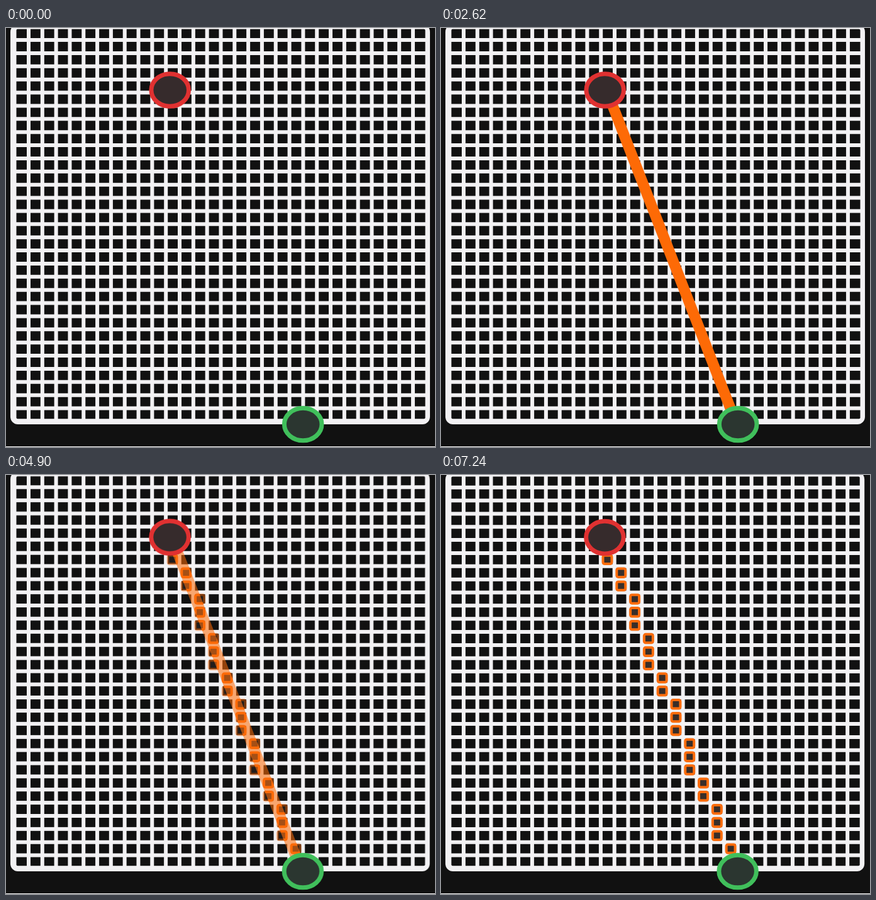
Write an HTML page that moves like this. It is 682x665 px and loops after 8.04 s.

```html
<!DOCTYPE html>
<html lang="en">
<head>
<meta charset="utf-8">
<title>Line to grid cells</title>
<style>
  html, body { margin: 0; width: 100%; height: 100%; overflow: hidden; background: #111; }
  svg { display: block; width: 100%; height: 100%; }
</style>
</head>
<body>
<svg viewBox="0 0 682 665">
  <defs>
    <g id="board">
      <rect x="7" y="-6" width="667" height="635" rx="12" fill="#f2f1f3"/>
      <rect x="16.5" y="1.8" width="650" height="618.4" rx="2" fill="#111"/>
      <path id="lines" stroke="#f2f1f3" stroke-width="6" fill="none"/>
    </g>
    <g id="ends" stroke-width="7">
      <ellipse cx="260.7" cy="98.5" rx="29.8" ry="25.8" fill="#362b2c" stroke="#e03131"/>
      <ellipse cx="472.2" cy="629" rx="29.8" ry="25.8" fill="#2b3630" stroke="#40bf5b"/>
    </g>
  </defs>
  <rect width="682" height="665" fill="#111"/>
  <use href="#board"/>
  <path id="ray" d="M263.8 100L470 629" stroke="#fd6a06" stroke-width="17.2"/>
  <use href="#ends"/>
  <g id="cellScene">
    <rect width="682" height="665" fill="#111"/>
    <g transform="matrix(.9988 0 0 .999 0 .7)">
      <use href="#board"/>
      <g id="cells" fill="#392e29" stroke="#fb6c0c" stroke-width="4"/>
      <use href="#ends"/>
    </g>
  </g>
  <rect y="664" width="682" height="1" fill="#fff"/>
</svg>
<script>
const LOOP = 8040, STEP = 70;
const SEPARATORS = 29, FIRST_ROW = 6, LAST_ROW = 28;
const $ = id => document.getElementById(id);

// Position of a separator; half indices give cell centres
const gridX = i => 36 + 21.82 * i;
const gridY = i => 19 + 20.875 * i;

let path = '';
for (let i = 0; i < SEPARATORS; i++) path += `M${gridX(i)} 0V622M14 ${gridY(i)}H669`;
$('lines').setAttribute('d', path);

// The sloping line, rounded to one cell per row
const columnAt = row => 11 + Math.floor((row - 3.65) / 2.65);

for (let row = FIRST_ROW; row <= LAST_ROW; row++) {
  const cell = document.createElementNS('http://www.w3.org/2000/svg', 'rect');
  const box = {
    x: gridX(columnAt(row) - 0.5) - 7.3, y: gridY(row - 0.5) - 6.7,
    width: 14, height: 13.4, rx: 2.5
  };
  for (const key in box) cell.setAttribute(key, box[key]);
  $('cells').append(cell);
}

// Stepped fade that begins with a barely visible first step
function fade(t, start, steps) {
  const step = Math.floor((t - start) / STEP);
  return step < 0 ? 0 : Math.min(1, Math.max(0.02, step / (steps - 1)));
}

function draw(t) {
  $('ray').setAttribute('opacity', fade(t, 1920, 11));
  $('cellScene').setAttribute('opacity', fade(t, 4620, 10));
}

const start = performance.now();
function tick() {
  draw((performance.now() - start) % LOOP);
  requestAnimationFrame(tick);
}
tick();
</script>
</body>
</html>
```
